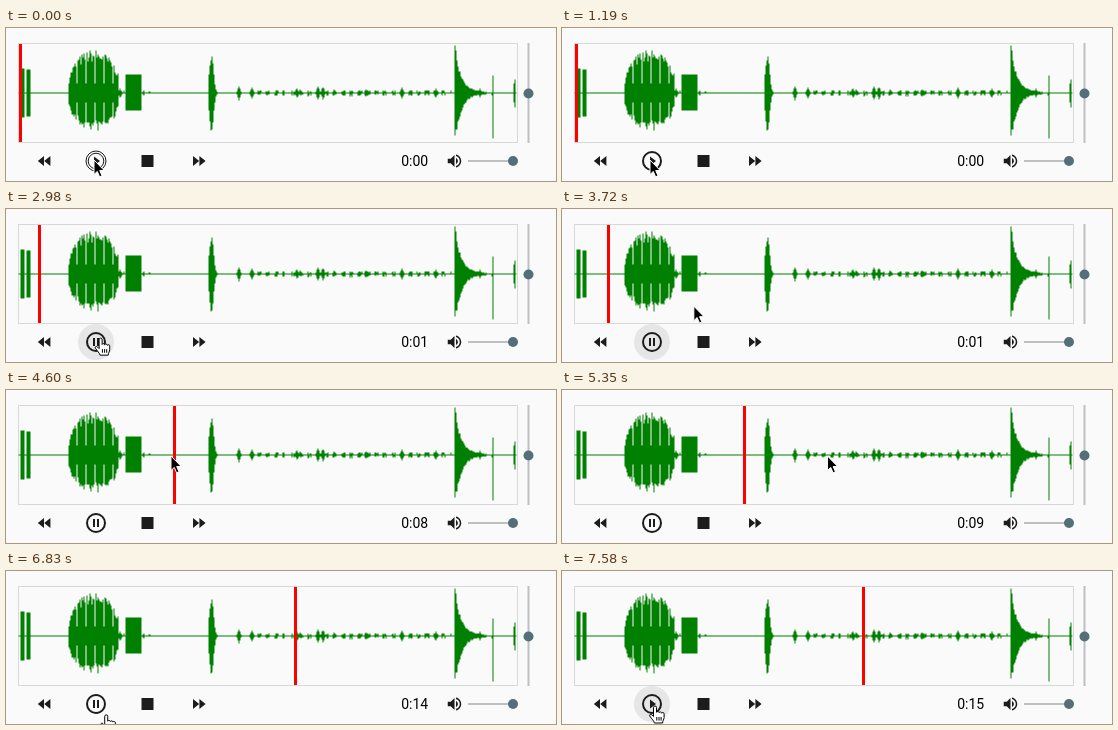
An HTML page for the animation above (8000 ms loop, 550 by 153 pixels).

```html
<!DOCTYPE html>
<html lang="en">
<head>
<meta charset="utf-8">
<title>Audio player</title>
<style>
  html, body { margin: 0; width: 100%; height: 100%; overflow: hidden; background: #fafafa; }
  svg { display: block; width: 550px; height: 153px; }
  text { font: 14px Roboto, Arial, sans-serif; fill: #000; }
</style>
</head>
<body>
<svg viewBox="0 0 550 153">
  <rect x="12.5" y="15.5" width="499" height="99" fill="none" stroke="#d8d8d8"/>
  <path id="wave" fill="#008000" transform="translate(-.5 -.5)"/>
  <rect id="head" y="16" width="3" height="98" fill="#f00"/>

  <circle id="ripple" cx="90" cy="133" r="18" fill="#e6e6e6"/>
  <g fill="#1c1c1c">
    <g fill="none" stroke="#1c1c1c">
      <circle id="ring" cx="90" cy="133" r="9" stroke-width="2"/>
      <g id="thinRing"><circle cx="90" cy="133" r="10"/><circle cx="90" cy="133" r="7.8"/></g>
    </g>
    <path id="play" d="M88 128.5l6 4.5-6 4.5z"/>
    <path id="pause" d="M87 129h2v8h-2zM91 129h2v8h-2z"/>
    <rect x="135.5" y="127" width="12" height="12"/>
    <path d="M38 128v10l-6.2-5zM44.4 128v10l-6.2-5z"/>
    <path d="M187 128v10l6.2-5zM193.4 128v10l6.2-5z"/>
    <path transform="translate(439.5 124) scale(.75)" d="M3 9v6h4l5 5V4L7 9H3zm13.5 3c0-1.77-1.02-3.29-2.5-4.03v8.05c1.48-.73 2.5-2.25 2.5-4.02zM14 3.23v2.06c2.89.86 5 3.54 5 6.71s-2.11 5.85-5 6.71v2.06c4.01-.91 7-4.49 7-8.77s-2.99-7.86-7-8.77z"/>
  </g>
  <text id="clock" x="395.2" y="138"></text>

  <g fill="#546e7a">
    <path d="M462 132h45v2h-45zM521.5 15h2v100h-2z" fill="#bdbfc1"/>
    <circle cx="507" cy="133" r="5"/>
    <circle cx="522.5" cy="65.5" r="5"/>
  </g>

  <path id="arrow" d="M0 0V14.5L3.3 11.4 5.6 16.8 8 15.8 5.7 10.5H10.2Z" fill="#000" stroke="#fff"/>
  <path id="hand" d="M-1.5 1.5a1.5 1.5 0 0 1 3 0V6.3a1.4 1.4 0 0 1 2.6.3 1.4 1.4 0 0 1 2.6.6 1.3 1.3 0 0 1 2.4.9V11.5c0 2-1.5 3-1.5 5.5H-.6c-.3-2-2.7-4-4.6-7-.8-1.6 1-2.2 2.1-1.1l1.6 1.6zM1.8 11v3.6M4 11v3.6M6.1 11v3.6" fill="#fff" stroke="#000"/>
</svg>
<script>
const LOOP = 8000, START = 1790, TICK = 148.2, LAST_TICK = 39;
const PX_PER_SECOND = 18.55, MID = 65;
const el = id => document.getElementById(id);
const clamp01 = v => Math.min(1, Math.max(0, v));

function wavePath() {
  let seed = 7;
  const rand = () => (seed = seed * 16807 % 2147483647) / 2147483647;
  let d = `M13 ${MID}H511v1H13z`;
  const fill = (x0, x1, rise, fall = rise) => {
    for (let x = x0; x <= x1; x++)
      d += `M${x} ${Math.round(MID - rise(x))}h1V${Math.round(MID + 1 + fall(x))}h-1z`;
  };
  const flat = h => () => h;
  const bell = (peak, centre, width) => x =>
    peak * Math.exp(-(((x - centre) / width) ** 2)) * (0.85 + 0.15 * rand());
  const decay = (peak, start, length) => x =>
    peak * Math.exp((start - x) / length) * (0.8 + 0.2 * rand());

  // Steady tones and single clicks
  fill(15, 18, flat(24));
  fill(21, 24, flat(23));
  fill(120, 135, flat(18), flat(17));
  fill(487, 487, flat(17), flat(45));
  fill(508, 509, x => (x - 506) * 4.5);

  // Speech: rounded envelope split into syllables
  const speech = peak => x => x % 9 === 8 ? 9
    : peak * Math.sin(Math.PI * (x - 62.5) / 51) ** 0.35 * (0.7 + 0.3 * rand());
  fill(63, 112, speech(43), speech(38));

  // Knocks and their tails
  fill(203, 212, bell(38, 205.5, 3));
  fill(449, 478, decay(46, 449.5, 6.5));

  // Murmur with a few louder words
  const murmur = x => Math.sin(x * 0.75) > 0 ? 2.6 * rand() : 0;
  fill(113, 118, murmur);
  fill(137, 144, murmur);
  fill(252, 445, murmur);
  fill(470, 486, murmur);
  for (const [x, h] of [[114, 4], [233, 7], [246, 5], [291, 4], [312, 7], [317, 6], [360, 3], [396, 5], [430, 4], [474, 4]])
    fill(x - 2, x + 2, bell(h, x, 1.5));
  return d;
}

// Pointer: rests and turning points as time, x, y
const pointerPath = [
  [2840, 87.8, 135], [3720, 132, 97], [4450, 165, 66], [4750, 165, 66],
  [5350, 266, 66], [5950, 266, 66], [6830, 100, 144], [7280, 93, 135]
];
function pointerAt(t) {
  if (t < START) return [88, 132];
  const next = Math.max(1, pointerPath.findIndex(p => p[0] >= t));
  const i = t > 7280 ? pointerPath.length - 1 : next;
  const [t0, ...from] = pointerPath[i - 1], [t1, ...to] = pointerPath[i];
  const u = clamp01((t - t0) / (t1 - t0));
  return from.map((v, j) => v + (to[j] - v) * u);
}

// The head runs at constant speed and jumps at each seek
const seeks = [{ at: 1940, x: 13.9 }, { at: 4420, x: 165.1 }, { at: 5480, x: 264.2 }];
const PAUSED_AT = 7480;
function headAt(t) {
  const run = seeks.filter(s => t >= s.at).pop();
  return run ? run.x + (Math.min(t, PAUSED_AT) - run.at) / 1000 * PX_PER_SECOND : 14.5;
}

const fade = (t, start) => clamp01((t - start) / 300);
const glowAt = t => fade(t, START) - fade(t, 4300) + fade(t, 7130);
const show = (id, on) => { el(id).style.display = on ? '' : 'none'; };

function render(time) {
  const tick = Math.min(LAST_TICK, Math.floor((time - START + 10) / TICK));
  const t = tick < 0 ? time : START + tick * TICK;
  const x = headAt(t);
  const playing = t >= START && t < PAUSED_AT;
  const thin = t < START && t % 1040 < 150;
  const overButton = (t >= START && t < 3100) || t > 6780;

  el('head').setAttribute('x', Math.round(x - 1.5));
  el('clock').textContent = '0:' + String(Math.max(0, Math.floor((x - 14) / PX_PER_SECOND))).padStart(2, '0');
  el('ripple').setAttribute('opacity', glowAt(t));
  show('ring', !thin);
  show('thinRing', thin);
  show('play', !playing);
  show('pause', playing);
  show('hand', overButton);
  show('arrow', !overButton);
  el(overButton ? 'hand' : 'arrow').setAttribute('transform', `translate(${pointerAt(t)})`);
}

el('wave').setAttribute('d', wavePath());
const began = performance.now();
function frame() {
  render((performance.now() - began) % LOOP);
  requestAnimationFrame(frame);
}
frame();
</script>
</body>
</html>
```
